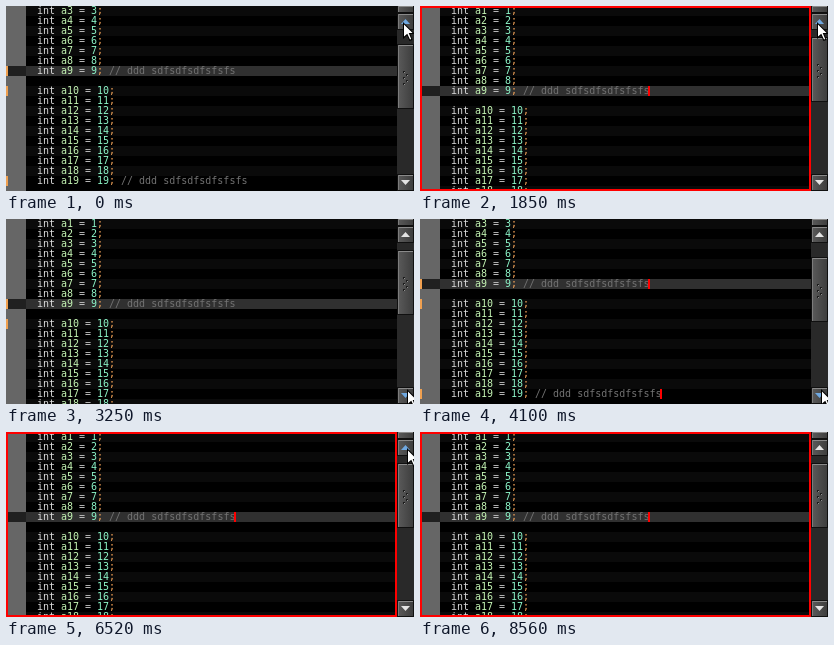
Animation of 408 by 185 pixels, one loop 9560 ms. Source, as an HTML page with a canvas:

```html
<!DOCTYPE html>
<html>
<head>
<meta charset="utf-8">
<style>
html, body { margin: 0; width: 408px; height: 185px; overflow: hidden; background: #000; }
canvas { display: block; }
</style>
</head>
<body>
<canvas id="stage" width="408" height="185"></canvas>
<script>
const ctx = document.getElementById('stage').getContext('2d');
const W = 408, H = 185, LOOP = 9560;
const ROW = 10, CHAR = 6, TEXT_X = 31, PANE = 391;
const COMMENT = '// ddd sdfsdfsdfsfsfs';

// One blank row follows a9.
const rows = [];
for (let n = 1; n <= 19; n++) {
  rows.push({ n, note: n % 10 === 9, mark: n === 9 || n === 10 || n === 19 });
  if (n === 9) rows.push({});
}

// [time, value] steps, held until the next one
const scrollSteps = [[0, 20], [1260, 10], [1320, 0], [3510, 10], [3570, 20], [6000, 10], [6060, 0]];
const caretSteps = [[0, 0], [330, 1], [860, 0], [1850, 1], [2310, 0], [2850, 1], [3250, 0],
  [4100, 1], [4620, 0], [5080, 1], [5540, 0], [6520, 1], [7050, 0], [7580, 1], [8030, 0], [8560, 1]];

// [time, x, y] of the pointer tip
const path = [[0, 397, 16], [2250, 397, 16], [2400, 404, 62], [2550, 406, 135], [2850, 401, 170],
  [4300, 401, 170], [4720, 404, 130], [5280, 401, 16], [7520, 401, 16], [7700, 412, 12], [LOOP, 412, 12]];

const held = (steps, t) => steps.filter(s => s[0] <= t).pop()[1];

function pointerAt(t) {
  const time = Math.floor(t / 10) * 10;
  const i = path.findIndex(p => p[0] > time);
  const a = path[i - 1], b = path[i];
  const k = (time - a[0]) / (b[0] - a[0]);
  return [Math.round(a[1] + (b[1] - a[1]) * k), Math.round(a[2] + (b[2] - a[2]) * k)];
}

function rect(color, x, y, w, h) {
  ctx.fillStyle = color;
  ctx.fillRect(x, y, w, h);
}

function shape(color, pts) {
  ctx.fillStyle = color;
  ctx.beginPath();
  pts.forEach(([x, y]) => ctx.lineTo(x, y));
  ctx.closePath();
  ctx.fill();
}

function drawCode(row, y) {
  let col = 0;
  const put = (text, color) => {
    ctx.fillStyle = color;
    ctx.fillText(text, TEXT_X + col * CHAR, y + 8);
    col += text.length;
  };
  put('int ', '#dcdcdc');
  put('a' + row.n, '#c4f5b4');
  put(' = ', '#c8c8c8');
  put(String(row.n), '#8cf5c8');
  put(';', '#f5a55a');
  if (row.note) put(' ' + COMMENT, '#727272');
  return TEXT_X + col * CHAR;
}

function drawEditor(scroll, caretOn) {
  rect('#000', 0, 0, PANE, H);
  rect('#666', 0, 0, 20, H);
  ctx.font = '10px "DejaVu Sans Mono", "Liberation Mono", monospace';
  let hidden = false;
  rows.forEach((row, i) => {
    const y = i * ROW - scroll;
    if (i % 2 === 0) rect('#0a0a0a', 20, y, PANE - 20, ROW);
    if (row.n === 9) {
      rect('#202020', 0, y, 20, ROW);
      rect('#303030', 20, y, PANE - 20, ROW);
    }
    if (row.mark) rect('#f0a050', 0, y, 2, ROW);
    if (!row.n) return;
    const end = drawCode(row, y);
    if (row.note && caretOn) {
      rect('#f00', end - 1, y, 2, ROW);
      if (y >= H) hidden = true;
    }
  });
  if (hidden) {
    ctx.strokeStyle = '#f00';
    ctx.lineWidth = 2;
    ctx.strokeRect(1, 1, PANE - 2, H - 2);
  }
}

function bevel(y, h) {
  const g = ctx.createLinearGradient(PANE, 0, W, 0);
  g.addColorStop(0, '#5c5c5c');
  g.addColorStop(1, '#3c3c3c');
  rect('#101010', PANE, y, W - PANE, h);
  rect(g, PANE + 1, y + 1, W - PANE - 2, h - 2);
  rect('#8a8a8a', PANE + 1, y + 1, W - PANE - 2, 1);
  rect('#7c7c7c', PANE + 1, y + 1, 1, h - 2);
}

function drawScrollbar(scroll, [mx, my]) {
  rect('#292929', PANE, 0, W - PANE, H);
  bevel(-1, 8);
  bevel(7, 17);
  bevel(168, 17);
  const over = top => mx >= PANE && mx < W && my >= top && my < top + 17;
  shape(over(7) ? '#6fa8e0' : '#e4e4e4', [[395, 18], [399.5, 13], [404, 18]]);
  shape(over(168) ? '#6fa8e0' : '#e4e4e4', [[395, 174], [404, 174], [399.5, 179]]);

  const top = Math.round(31 + scroll * 0.36);
  bevel(top, 65);
  for (let i = 0; i < 5; i++) {
    const x = 397 + (i % 2) * 3, y = top + 27 + i * 3;
    rect('#1c1c1c', x, y, 2, 2);
    rect('#909090', x + 1, y + 1, 1, 1);
  }
}

function drawPointer([x, y]) {
  ctx.save();
  ctx.translate(x, y);
  shape('#000', [[0, 0], [0, 17], [4, 13.5], [6.5, 19], [9.5, 18], [7.2, 12], [12, 12]]);
  shape('#fff', [[1, 2.4], [1, 14.6], [4.3, 11.7], [7, 17.6], [8.2, 17.1], [5.7, 11], [9.6, 11]]);
  ctx.restore();
}

function frame(now) {
  const t = (now - start + LOOP) % LOOP;
  const scroll = held(scrollSteps, t);
  const tip = pointerAt(t);
  drawEditor(scroll, held(caretSteps, t));
  drawScrollbar(scroll, tip);
  drawPointer(tip);
  requestAnimationFrame(frame);
}

const start = performance.now();
frame(start);
</script>
</body>
</html>
```
